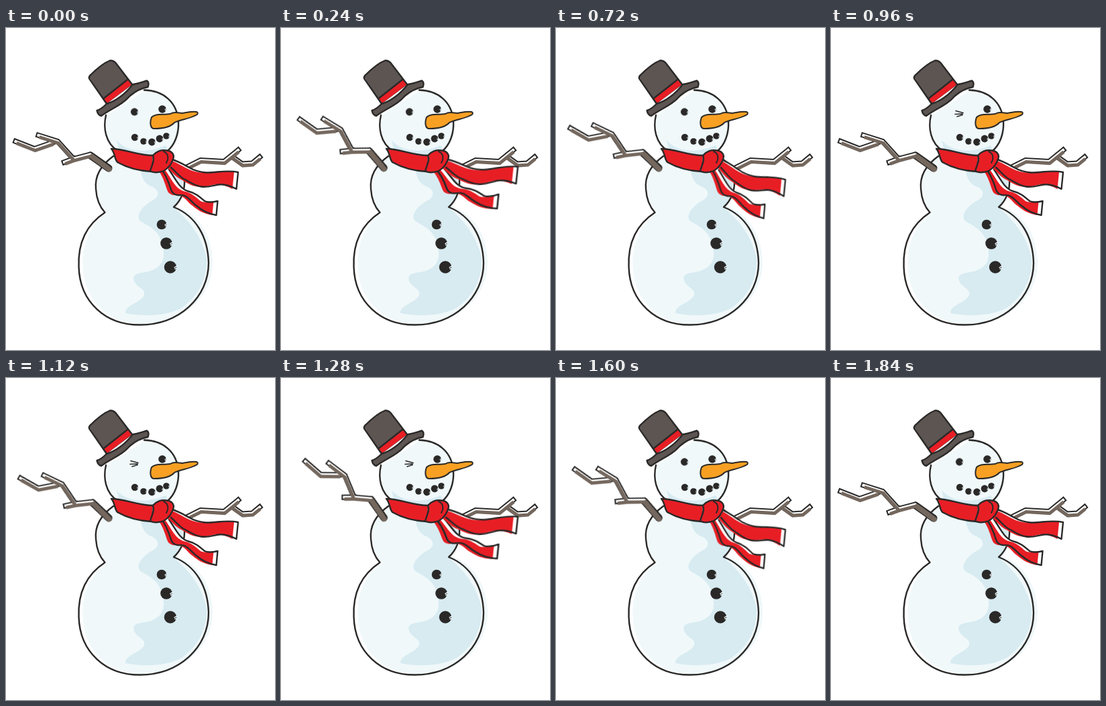
An HTML page for the animation above (1920 ms loop, 401 px wide and 480 px high).

```html
<!DOCTYPE html>
<html lang="en">
<head>
<meta charset="utf-8">
<title>Waving snowman</title>
<style>
html, body { margin: 0; width: 100%; height: 100%; overflow: hidden; background: #fff; }
svg { display: block; width: 401px; height: 480px; }
.line { fill: none; stroke: #2a2928; stroke-width: 2.4; stroke-linecap: round; stroke-linejoin: round; }
.snow { fill: #f0f8fa; }
.shade { fill: #d7ebf1; }
.red { fill: #e81e25; }
.felt { fill: #5d5552; }
.ink { fill: #2a2928; }

/* Branches: dark rim, white core, wood slightly off register */
.rim, .core, .wood { fill: none; stroke-linejoin: miter; }
.rim { stroke: #2a2928; stroke-width: 8; stroke-linecap: square; }
.core { stroke: #fff; stroke-width: 4; stroke-linecap: square; }
.wood { stroke: #74675d; stroke-width: 5; transform: translate(1px, 2.6px); }

#wave, #upper, #lower { animation: 960ms step-end infinite; }
#wave { transform-origin: 155px 210px; animation-name: wave; }
#upper { transform-origin: 245px 205px; animation-name: upper; }
#lower { transform-origin: 235px 215px; animation-name: lower; }
#open { animation: open 1920ms step-end infinite; }
#wink { animation: wink 1920ms step-end infinite; }

@keyframes wave {
  0%, 91.66%, 100% { transform: rotate(0deg); }
  8.33%, 83.33% { transform: rotate(3deg); }
  16.66%, 75% { transform: rotate(8.2deg); }
  25%, 66.66% { transform: rotate(13.9deg); }
  33.33%, 58.33% { transform: rotate(19.6deg); }
  41.66%, 50% { transform: rotate(22.6deg); }
}
@keyframes upper {
  0%, 50%, 91.66%, 100% { transform: none; }
  25% { transform: matrix(1.07, -.08, 0, 1, 0, 0); }
  66.66% { transform: matrix(.96, .11, 0, 1, 0, 0); }
}
@keyframes lower {
  0%, 50%, 91.66%, 100% { transform: none; }
  25% { transform: matrix(1.11, -.125, 0, 1, 0, 0); }
  66.66% { transform: matrix(.95, .06, 0, 1, 0, 0); }
}
@keyframes open { 0%, 79.16%, 100% { opacity: 1; } 50% { opacity: 0; } }
@keyframes wink { 0%, 79.16%, 100% { opacity: 0; } 50% { opacity: 1; } }
</style>
</head>
<body>
<svg viewBox="0 0 401 480">
<defs>
  <path id="bottom" d="M147.500 275C120 293 107 321 108.500 356C110 409 149 443 200 442.500C258 442 302 402 302 350C301 311 283 280 250 267Z"/>
  <path id="middle" d="M160 191C142 204 132 220 134 240C135 256 140 267 147.500 275L233 276C247 270 267 250 266 225C265 211 258 202 248 195Z"/>
  <path id="head" d="M149 130C145 147 147 172 168 184C188 193 224 193 240 184C252 174 258 157 257 139C255 110 234 93 206 92.500"/>
  <path id="twigs" d="M14.500 169L42.500 180L70 170.500M48.500 160L77 169L100.500 195L125.500 188.500L150 206M87 200L100.500 195"/>
  <path id="rightTwigs" d="M262 211L290 197L325 199L346 182M336 191L352 202.500L367 201.500L378 192.500"/>
  <g id="dot">
    <circle class="ink" r="1"/>
    <path d="M.62 .1L1.1 -.2M.7 .3L1.1 .2" stroke="#eff7fa" stroke-width=".18"/>
  </g>
  <path id="upperCloth" d="M247 196C258 199 264 203 272 207.500C280 212 289 215 298 215.500C313 216 329 211 346 215L343.500 240C336 236 327 232 317 233.500C308 235 300 238 291 236.500C280 235 275 230 265 225C258 221 253 214 246 208"/>
  <path id="lowerCloth" d="M233 212C239 221 240 224 243 232C246 241 247 246 252 248C257 251 262 247 268 251C276 256 277 260 284 265C292 272 301 277 313.500 279L315.500 258C307 260 300 260 296 258C289 252 283 246 272 243.500C259 240 254 227 243 211"/>
</defs>

<use href="#rightTwigs" class="rim"/>
<use href="#rightTwigs" class="core"/>
<use href="#rightTwigs" class="wood"/>

<!-- Body -->
<use href="#bottom" fill="#fff"/>
<use href="#middle" fill="#fff"/>
<use href="#bottom" class="snow" x="6" y="-1"/>
<use href="#middle" class="snow" x="2"/>
<path class="shade" d="M200 208C203 229 209 233 219 237C230 243 229 253 215 259C205 265 190 281 202 289C214 295 229 304 233 322C238 341 235 355 216 362C202 366 187 364 191 377C195 387 209 389 206 398C201 410 178 412 178 425C207 431 241 429 262 417C285 401 300 377 299 343C292 312 275 288 249 267C263 253 266 232 262 213Z"/>
<path class="line" d="M160 191C142 204 132 220 134 240C135 256 140 267 147.500 275C120 293 107 321 108.500 356C110 409 149 443 200 442.500C258 442 302 402 302 350C301 311 283 280 250 267C261 257 267 244 266 225C265 211 258 202 248 195"/>
<use href="#dot" transform="translate(232 293) scale(7.3)"/>
<use href="#dot" transform="translate(239 321) scale(8.8)"/>
<use href="#dot" transform="translate(245 356.500) scale(9.200)"/>

<!-- Head -->
<use href="#head" fill="#fff"/>
<use href="#head" class="snow" x="2"/>
<path class="shade" d="M165 167C181 187 213 186 238 175L242 184C222 193 185 193 169 184Z"/>
<use href="#head" class="line"/>
<g id="open"><use href="#dot" transform="translate(191.500 125) scale(5.600)"/></g>
<path id="wink" class="line" style="stroke-width:1.700" d="M186 123.500L197 126.500M185 128.500L196 128M188 132L196 129.500"/>
<use href="#dot" transform="translate(233 121) scale(5.800)"/>
<use href="#dot" transform="translate(192 163) scale(5.200)"/>
<use href="#dot" transform="translate(205 169) scale(4.800)"/>
<use href="#dot" transform="translate(217.500 170) scale(5.400)"/>
<use href="#dot" transform="translate(229 165) scale(5.400)"/>
<use href="#dot" transform="translate(239 161) scale(4.800)"/>
<path class="line" style="fill:#f8a023;stroke-width:2" d="M217 133C214 141 215 150 221 150C234 150 245 148 251 141C260 136 273 136 285 129Q287 126 284 125C276 124 270 126 263 127C255 126 250 125 245 128C234 130 223 127 217 133Z"/>

<!-- Hat -->
<path class="felt" d="M124 73C134 61 146 52 157 48L163 52L189 84L150 113Z"/>
<path class="red" d="M145.500 105L181 77L188 84L151 112Z"/>
<path class="line" d="M150 113L124.500 76Q122.500 73 126 70C136 60 146 52 155 48.500Q160 48 163.500 52L188 84M145.500 105L181 77"/>
<path class="line" style="fill:#5d5552" d="M150 113C166 108 178 98 189 84C198 83 204 80 210 78.500Q214 81 211.500 88C200 90 192 95 185 101C172 116 158 119 142 131Q137 130 135.500 123Q142 121 150 113Z"/>

<!-- Waving arm -->
<g id="wave">
  <use href="#twigs" class="rim"/>
  <path d="M126 190L153 209" class="rim" style="stroke-width:11;stroke-linecap:round"/>
  <use href="#twigs" class="core"/>
  <use href="#twigs" class="wood"/>
  <path d="M127 189L153 208" class="wood" style="stroke-width:7.500;stroke-linecap:round"/>
</g>

<!-- Scarf -->
<g id="lower">
  <use href="#lowerCloth" fill="#fff"/>
  <use href="#lowerCloth" class="red" x="-6"/>
  <use href="#lowerCloth" class="line"/>
</g>
<g id="upper">
  <use href="#upperCloth" fill="#fff"/>
  <use href="#upperCloth" class="red" x="-6"/>
  <use href="#upperCloth" class="line"/>
</g>
<path class="red" d="M157 180C177 180 197 190 219 190L217 214C199 213 180 208 166 200Z"/>
<path class="line" d="M219 190C197 190 177 180 157 180C163 187 161 194 166 200C180 208 199 213 217 214"/>
<path class="line" style="fill:#e81e25" d="M219 190C224 184 232 181 239 182.500C247 183 251 188 249.500 194C247 203 242 209 235 213C228 216 219 216 215 213C217 205 222 198 219 190Z"/>
<path class="line" style="stroke-width:2" d="M235 184C242 187 243 194 239 201"/>
</svg>
</body>
</html>
```
